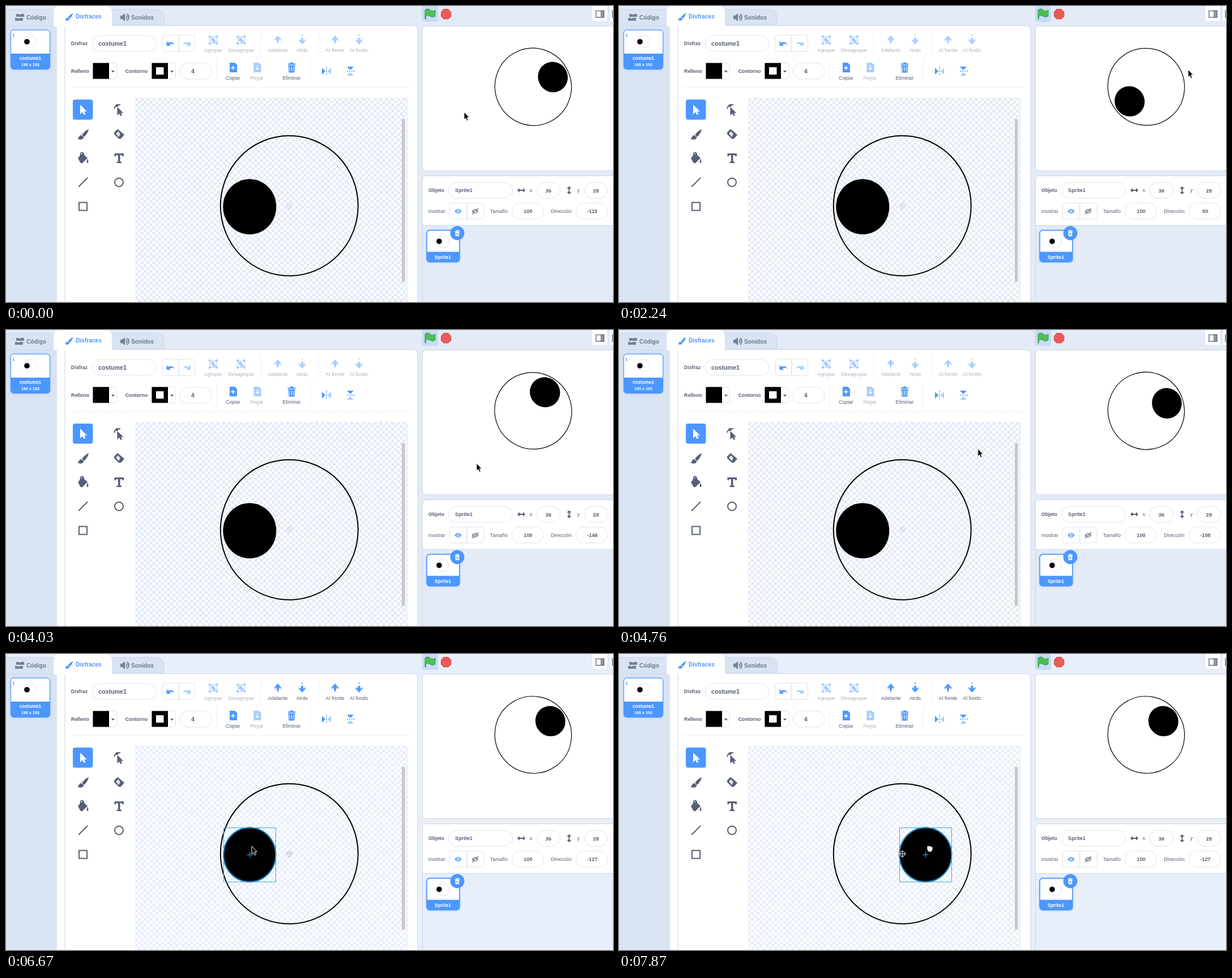
Recreate the animation shown at these times as an HTML page. Size 1072 by 522 pixels, loop 8 s.

```html
<!DOCTYPE html>
<html lang="es">
<head>
<meta charset="utf-8">
<title>Editor de disfraces</title>
<style>
  html, body { margin: 0; width: 100%; height: 100%; overflow: hidden; }
  svg { display: block; width: 100%; height: 100%; --page: #e4ebf6; --check: #e2eaf6; --centre: #d3ddee; }
  svg.bright { --page: #e8effa; --check: #e7eefa; --centre: #c5cad3; }
  text { font: 8.8px "Liberation Sans", Arial, sans-serif; fill: #575e75; text-anchor: middle; }
  .b { font-weight: bold; }
  .page { fill: var(--page); }
  .side { fill: #d9e3f2; }
  .white { fill: #fff; }
  .blue { fill: #4c97ff; }
  .ink { fill: #575e75; }
  .edge { stroke: #cbd5e6; }
  .pill { fill: #fff; stroke: #dce5f3; }
  .line { fill: none; stroke: #575e75; stroke-width: 2; }
  .bline { fill: none; stroke: #4c97ff; stroke-width: 1.5; }
  .dots { fill: none; stroke: #d5dfee; stroke-dasharray: 2 2; }
  .dim { opacity: .48; }
</style>
</head>
<body>
<svg id="scene" viewBox="0 0 1072 522" preserveAspectRatio="none">
  <defs>
    <pattern id="checker" x="500.3" y="352.3" width="10.28" height="10.28" patternUnits="userSpaceOnUse">
      <path d="M0 0h5.14v5.14H0zM5.14 5.14h5.14v5.14H5.14z" fill="var(--check)"/>
    </pattern>
    <path id="up" d="M0 -9L6 -2H2V3H-2V-2H-6Z"/>
    <path id="brush" d="M10 -9Q5 -7 -2 1L2 5Q9 -2 10 -9ZM-3 2Q-7 2 -7 5Q-8 8 -10 8Q-3 11 0 8Q2 6 1 5Z"/>
    <path id="pointer" d="M-5 -9V8L-1 4L1.5 9L4.5 7.5L2 3H7Z"/>
    <path id="bin" d="M-7 -7H-3L-2 -9H2L3 -7H7V-5H-7ZM-6 -4H6L5 9H-5Z"/>
    <path id="drop" d="M-3 -1.5H3L0 2Z"/>
    <path id="undo" d="M-7 -4V4H1L-2 1.5Q3 -1 7 3Q4 -5 -4 -1Z"/>
    <path id="eye" d="M-6 0Q0 -8 6 0Q0 8 -6 0Z"/>
    <path id="double" d="M-7 0L-3 -4V-1H3V-4L7 0L3 4V1H-3V4Z"/>
    <g id="page-icon">
      <path class="blue" d="M-6 -8H3L7 -4V9H-6Z"/>
    </g>
    <g id="group-icon">
      <path class="bline" d="M-6 -6H6V6H-6Z" stroke-dasharray="2 1"/>
      <path class="blue" d="M-4 -4H2V2H-4ZM-1 0H4V5H-1ZM-8 -8h4v4h-4ZM4 -8h4v4H4ZM-8 4h4v4h-4ZM4 4h4v4H4Z"/>
    </g>
    <g id="flip">
      <path class="blue" d="M-8 -6L-2 0L-8 6Z"/>
      <path class="blue dim" d="M8 -6L2 0L8 6Z"/>
      <path class="bline" d="M0 -8V8" stroke-dasharray="2 2" stroke-width="1"/>
    </g>
    <g id="thumb">
      <circle cx="6" r="11" fill="#fff" stroke="#e5e5e5"/>
      <circle r="4.8"/>
    </g>
    <clipPath id="easel"><path d="M229 163H709V522H229Z"/></clipPath>
  </defs>

  <path class="page" d="M0 0H1072V522H0Z"/>

  <!-- tabs and panels -->
  <path class="side" d="M0 34H90.500V522H0Z"/>
  <path class="side edge" d="M-5 35V6H77Q90 6 90 20V35Z"/>
  <path class="side edge" d="M184 35V6H264Q279 6 279 20V35Z"/>
  <path class="white" d="M90 522V35H719Q727 35 727 43V522Z"/>
  <path class="edge" fill="none" d="M187 34.500H719Q727 35 727 43V522M104 35V522"/>
  <path class="white" d="M84 36V12Q84 0 96 -1H174Q187 0 187 13V36Z"/>
  <g class="ink" opacity=".75">
    <path d="M18 14h4l1 1h2l1 -1h6v5h-14ZM16 21h4l1 1h2l1 -1h6v5H16Z"/>
    <path d="M202 17h3l5 -4v14l-5 -4h-3Z"/>
    <path class="line" stroke-width="1.500" d="M212 17q3 3 0 6M214 14q6 6 0 12"/>
  </g>
  <use href="#brush" class="blue" transform="translate(111 19) scale(.72)"/>
  <text class="b" x="53.500" y="24" style="font-size:10.200px;opacity:.8">Código</text>
  <text class="b" x="146" y="22" style="font-size:10.200px;fill:#4c97ff">Disfraces</text>
  <text class="b" x="241" y="24" style="font-size:10.200px;opacity:.8">Sonidos</text>

  <!-- costume list -->
  <rect x="6.500" y="40.500" width="73" height="73" rx="8" fill="#b7d2fa"/>
  <rect class="blue" x="8" y="42" width="70" height="70" rx="6"/>
  <path class="white" d="M9 84V48Q9 43 14 43H72Q77 43 77 48V84Z"/>
  <text x="13.500" y="54" style="font-size:8px">1</text>
  <use href="#thumb" x="37" y="63"/>
  <text class="b" x="43" y="95" style="font-size:8.200px;fill:#fff">costume1</text>
  <text class="b" x="43" y="106" style="font-size:7.200px;fill:#fff">190 x 193</text>

  <!-- top toolbar -->
  <text class="b" x="129.500" y="69">Disfraz</text>
  <rect class="pill" x="152.500" y="52" width="112.500" height="28" rx="14"/>
  <text class="b" x="188" y="70" style="font-size:10.700px">costume1</text>
  <rect class="pill" x="276.500" y="51.500" width="57" height="29" rx="4"/>
  <path class="edge" d="M305 52V80"/>
  <use href="#undo" class="blue" x="290.500" y="66"/>
  <use href="#undo" class="blue dim" transform="translate(319 66) scale(-1 1)"/>
  <g class="dim">
    <use href="#group-icon" x="366" y="60"/>
    <use href="#group-icon" x="415" y="60"/>
    <text x="366" y="81">Agrupar</text>
    <text x="415" y="81">Desagrupar</text>
  </g>
  <path class="dots" d="M450 46V86M552 46V86M372 95V135M537 95V135M115 143.500H716"/>
  <g id="order" class="blue">
    <use href="#up" x="480" y="61"/>
    <use href="#up" transform="translate(523 59) scale(1 -1)"/>
    <use href="#up" x="581" y="61"/>
    <use href="#up" transform="translate(623.500 59) scale(1 -1)"/>
    <path class="bline" d="M474 60H477M483 60H486M517 60H520M526 60H529M574 60H578M584 60H588M617 60H621M627 60H630M480 64V67M523 53V50M581 64V67M623.500 53V50"/>
    <text x="480" y="81">Adelante</text>
    <text x="523" y="81">Atrás</text>
    <text x="581" y="81">Al frente</text>
    <text x="623.500" y="81">Al fondo</text>
  </g>
  <text class="b" x="131" y="118">Relleno</text>
  <text class="b" x="230.500" y="118">Contorno</text>
  <g id="pickers">
    <rect class="pill" x="153.500" y="100.500" width="42" height="28" rx="3"/>
    <rect class="pill" x="257.500" y="100.500" width="42" height="28" rx="3"/>
    <path d="M153.500 100.500H182V128.500H153.500ZM257.500 100.500H286V128.500H257.500Z"/>
    <path class="white" d="M265 108H278.500V121H265Z"/>
    <use href="#drop" class="ink" x="189" y="115.500"/>
    <use href="#drop" class="ink" x="293" y="115.500"/>
  </g>
  <rect class="pill" x="307" y="101" width="56" height="28" rx="14"/>
  <text class="b" x="330" y="119" style="font-size:10.500px">4</text>
  <use href="#page-icon" x="401" y="108"/>
  <path d="M401 105v8M397 109h8" stroke="#fff" stroke-width="1.500"/>
  <text x="401" y="130">Copiar</text>
  <g class="dim">
    <use href="#page-icon" x="443.500" y="108"/>
    <path d="M444 104v8M441 109l3 3l3 -3" fill="none" stroke="#fff" stroke-width="1.500"/>
    <text x="443" y="130">Pegar</text>
  </g>
  <use href="#bin" class="blue" x="504.500" y="108.500"/>
  <path d="M501 107v8M504.500 107v8M508 107v8" stroke="#fff"/>
  <text x="504.500" y="130">Eliminar</text>
  <use href="#flip" x="566" y="115"/>
  <use href="#flip" transform="translate(608 115) rotate(90)"/>

  <!-- drawing tools -->
  <rect class="blue" x="118" y="165" width="35.500" height="35.500" rx="4"/>
  <use href="#pointer" class="white" x="136" y="183"/>
  <g class="ink">
    <use href="#pointer" transform="translate(201 186) scale(.9)"/>
    <path class="line" stroke-width="1.500" d="M191 181Q192 174 202 174"/>
    <circle cx="196" cy="175.500" r="2.500"/>
    <use href="#brush" x="136" y="226"/>
    <path d="M191 223L197 217L209 227L203 234H199L191 226Z"/>
    <path class="white" d="M194 225L198 221L202 226L199 231Z" opacity=".85"/>
    <path d="M127 268L135 260L144 268L135 277Q133 278 131 276ZM144 269Q147 277 144 277Q141 277 144 269Z"/>
    <path class="line" d="M131 268L132 260Q135 256 137 261V266"/>
    <path d="M191.500 260H208V265H205.500L205 263H201.500V274L204 275V277H195.500V275L198 274V263H194.500L194 265H191.500Z"/>
  </g>
  <path class="line" d="M128 319L144 303M129 346.500H143V360.500H129Z"/>
  <circle class="line" cx="199.500" cy="311" r="7.500"/>

  <!-- paint area -->
  <path class="white" d="M229 163H709V522H229Z"/>
  <path fill="url(#checker)" d="M229 163H709V522H229Z"/>
  <path fill="none" stroke="#e1e9f5" d="M229 522V163H708.500V522"/>
  <g clip-path="url(#easel)">
    <ellipse cx="500.300" cy="352.300" rx="121.500" ry="123.500" fill="none" stroke="#000" stroke-width="2"/>
    <g id="dragged">
      <ellipse cx="430.300" cy="354" rx="47" ry="48.800"/>
      <ellipse id="outline" cx="430.300" cy="354" rx="46" ry="47.800" fill="none" stroke="#1587c9" stroke-width="2"/>
      <g id="selection" fill="none" stroke="#3aa9e0">
        <path d="M384.500 306.500H476.500V402H384.500Z"/>
        <path d="M425.500 354H435.500M430.500 349V359" stroke="#0d6fae" stroke-width="2"/>
      </g>
    </g>
    <path id="centre" fill="none" stroke="var(--centre)" stroke-width="1.300" d="M494 352.300H507M500.500 346V359M496 352.300a4.500 4.500 0 1 0 9 0a4.500 4.500 0 1 0 -9 0"/>
  </g>
  <rect x="699" y="199" width="5.500" height="288" rx="2.700" fill="#c6c8cb"/>

  <!-- stage -->
  <rect x="734.500" y="0" width="28.500" height="28" rx="4" fill="#c5dcfa"/>
  <path d="M740 7Q745 3 749 7T758 7V18Q753 21 749 18T741.500 18V23H740Z" fill="#4cbf56" stroke="#45993d"/>
  <path d="M773 5.500H781L786 10.500V18.500L781 23H773L768.500 18.500V10.500Z" fill="#ec5959" stroke="#c95b5b"/>
  <rect class="pill edge" x="1034.500" y="-5" width="28" height="32" rx="4"/>
  <path class="pill edge" d="M1080 -1H1066V27H1080Z"/>
  <path class="line" opacity=".65" stroke-width="1.200" d="M1042 8.500H1056V20H1042ZM1071 8.500H1080V20H1071Z"/>
  <path class="ink" opacity=".65" d="M1050 8H1056V20H1050Z"/>
  <rect class="white edge" x="735.500" y="35.500" width="345" height="255" rx="6"/>
  <g id="sprite">
    <ellipse rx="67.300" ry="68.300" fill="none" stroke="#000" stroke-width="1.200"/>
    <ellipse cx="-38.800" cy="1" rx="26.200" ry="27"/>
  </g>

  <!-- sprite panel -->
  <path class="page edge" d="M735.500 530V306Q735.500 299.500 742 299.500H1080V530Z"/>
  <path class="white" d="M736 387V306Q736 300 742 300H1072V387Z"/>
  <path class="edge" d="M736 387H1072"/>
  <text class="b" x="760" y="328">Objeto</text>
  <rect class="pill" x="781.500" y="311" width="113" height="28" rx="14"/>
  <text class="b" x="808.500" y="328" style="font-size:9.100px">Sprite1</text>
  <use href="#double" class="ink" x="910" y="325"/>
  <use href="#double" class="ink" transform="translate(994.500 325) rotate(90)"/>
  <text x="927" y="328">x</text>
  <text x="1011" y="328">y</text>
  <rect class="pill" x="937.500" y="311" width="41.500" height="28" rx="14"/>
  <rect class="pill" x="1021" y="311" width="42" height="28" rx="14"/>
  <text class="b" x="958" y="328.500" style="font-size:9.300px">36</text>
  <text class="b" x="1042" y="328.500" style="font-size:9.300px">28</text>
  <text x="761" y="365">mostrar</text>
  <rect class="pill" x="783.500" y="347.500" width="60.500" height="28" rx="4"/>
  <path class="edge" d="M814 348V375"/>
  <use href="#eye" class="blue" x="798.500" y="362"/>
  <circle class="white" cx="798.500" cy="362" r="2.600"/>
  <circle class="blue" cx="798.500" cy="362" r="1.300"/>
  <g opacity=".7">
    <use href="#eye" class="ink" x="828.500" y="362"/>
    <circle class="white" cx="828.500" cy="362" r="2.600"/>
    <path class="line" stroke-width="1.300" d="M823 367L834 357"/>
  </g>
  <text x="870.500" y="365">Tamaño</text>
  <rect class="pill" x="893.500" y="347.500" width="56" height="28" rx="14"/>
  <text class="b" x="922" y="365" style="font-size:9.300px">100</text>
  <text x="980.500" y="365">Dirección</text>
  <rect class="pill" x="1006.500" y="347.500" width="56" height="28" rx="14"/>
  <text id="direction" class="b" x="1035.500" y="365" style="font-size:9.300px"></text>
  <rect x="741" y="393.500" width="62" height="60" rx="8" fill="#b7d2fa"/>
  <rect class="blue" x="742.500" y="395" width="59" height="57" rx="6"/>
  <path class="white" d="M744 433.500V401Q744 396.500 749 396.500H795Q800 396.500 800 401V433.500Z"/>
  <use href="#thumb" x="765" y="415"/>
  <text class="b" x="771.500" y="446" style="font-size:8.600px;fill:#fff">Sprite1</text>
  <circle class="blue" cx="797" cy="400.500" r="12.500"/>
  <use href="#bin" class="white" transform="translate(797 400.500) scale(.62)"/>
  <path d="M795 400l4 4M799 400l-4 4" stroke="#4c97ff"/>

  <g id="cursor" stroke="#fff" stroke-linejoin="round">
    <path id="arrow" d="M0 0V13.500L3 10.800L5.200 15.600L7.500 14.500L5.300 9.800H9.300Z"/>
    <path id="fist" fill="#fff" stroke="#000" stroke-width=".8" d="M10 0.500Q11 -1.500 12.500 0Q14 -2 15.500 0Q17.500 -1 18 1Q20 0.500 20 3V6L18 9V10H12V8L10 6Z"/>
  </g>
</svg>
<script>
const STEP = 148.3, LOOP = 8000, LAG = 0.6;
const BRIGHT_AT = 33, HOVER_AT = 39, SELECT_AT = 45, DRAG_AT = 46, DRAG_END = 53;
const eye = { x: 931, y: 142.5 };
// [step, x, y]
const path = [
  [-1, 809, 207], [0, 809, 187], [3, 809, 162], [6, 809, 162], [9, 831, 108], [10, 831, 86],
  [12, 878, 58], [13, 934, 58], [14, 974, 86], [15, 1005, 112], [18, 1026, 168],
  [22, 996, 232], [25, 915, 270], [26, 876, 262], [27, 831, 235], [30, 735, 205],
  [35, 482, 216], [36, 442, 239], [38, 432, 290], [41, 434, 339], [60, 434, 339],
];
const el = Object.fromEntries([...document.querySelectorAll('[id]')].map(e => [e.id, e]));
const clamp = (v, lo, hi) => Math.min(hi, Math.max(lo, v));
const show = (node, on) => node.setAttribute('visibility', on ? 'visible' : 'hidden');
const move = (node, x, y, turn = 0) =>
  node.setAttribute('transform', `translate(${x} ${y}) rotate(${turn})`);

function mouseAt(step) {
  const i = path.findIndex(key => key[0] > step);
  const [s0, x0, y0] = path[i - 1], [s1, x1, y1] = path[i];
  const k = (step - s0) / (s1 - s0);
  return { x: x0 + (x1 - x0) * k, y: y0 + (y1 - y0) * k };
}

// The sprite points at the mouse, which is limited to the stage.
function directionAt(step) {
  const mouse = mouseAt(step - LAG);
  const dx = clamp(mouse.x, 735, 1076) - eye.x;
  const dy = clamp(mouse.y, 35, 290) - eye.y;
  return Math.atan2(dx, -dy) * 180 / Math.PI;
}

function draw(time) {
  const step = Math.floor((time % LOOP + 10) / STEP);
  const mouse = mouseAt(step);
  const direction = directionAt(step);
  const k = clamp((step - SELECT_AT) / (DRAG_END - SELECT_AT), 0, 1);
  const drag = 111 * k * k * (3 - 2 * k);
  const selected = step >= SELECT_AT, dragging = step >= DRAG_AT;

  el.scene.classList.toggle('bright', step >= BRIGHT_AT);
  el.order.classList.toggle('dim', !selected);
  el.direction.textContent = Math.round(direction);
  move(el.sprite, eye.x, eye.y, direction - 90);
  move(el.dragged, drag, 0);
  move(el.cursor, mouse.x + drag, mouse.y);
  show(el.outline, step >= HOVER_AT);
  show(el.selection, selected);
  show(el.arrow, !dragging);
  show(el.fist, dragging);
  el.fist.setAttribute('transform', 'translate(-11 0)');
}

const start = performance.now();
function tick() {
  draw(performance.now() - start);
  requestAnimationFrame(tick);
}
tick();
</script>
</body>
</html>
```
